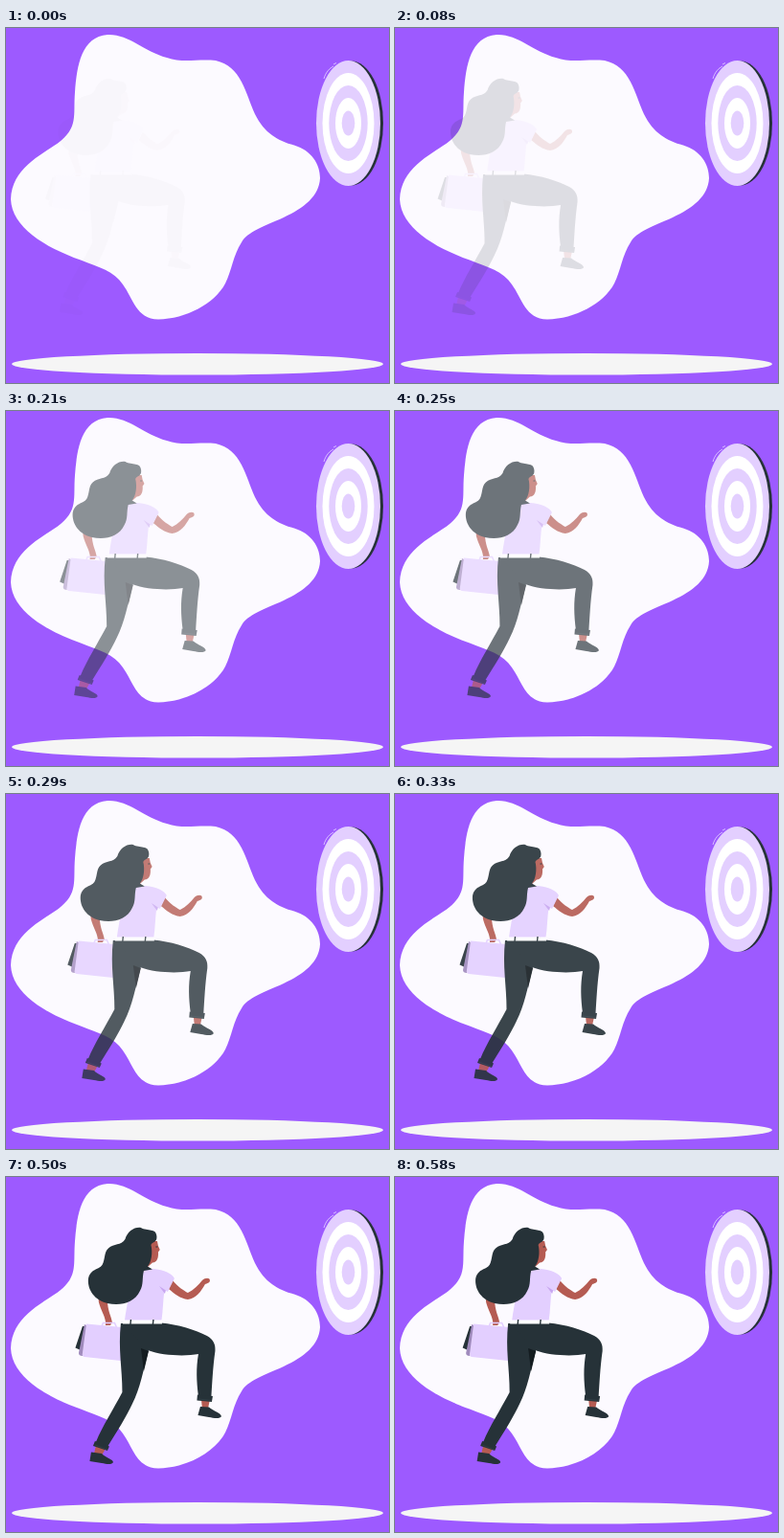
An HTML page for the animation above (620 ms loop, 400 by 371 pixels).

```html
<!DOCTYPE html>
<html lang="en">
<head>
<meta charset="utf-8">
<title>Running to the target</title>
<style>
  html, body { margin: 0; height: 100%; overflow: hidden; background: #9d5aff; }
  svg { display: block; width: 400px; height: 371px; }
  .dark { fill: #263238; }
  .lilac { fill: #e3cfff; }
  .skin { fill: #b55b52; }
  .white { fill: #fff; }
  .line { fill: none; }
</style>
</head>
<body>
<svg viewBox="0 0 400 371">
  <path fill="#fcfaff" d="M106 7C128 6 143 24 168 31C185 37 200 32 219 34C246 40 250 68 260 90C270 110 284 118 301 122.500C319 128 328 142 328 157C327 176 311 188 290 198C270 207 252 213 246 224C237 238 236 253 229 267C218 288 188 304 159 304.500C136 304 133 283 122 268C113 254 97 250 78 242.500C40 229 6 208 5 179C6 147 36 133 54 120.500C76 104 70 92 72 67C74 39 79 9 106 7Z"/>
  <ellipse fill="#f5f5f5" cx="200" cy="351.3" rx="194" ry="11.3"/>

  <g id="target">
    <ellipse class="dark" cx="360.5" cy="99.5" rx="33.5" ry="65"/>
    <ellipse class="lilac" cx="357.5" cy="99.5" rx="33.5" ry="65.5"/>
    <ellipse class="white" cx="357.5" cy="99.5" rx="27" ry="52.5"/>
    <ellipse class="lilac" cx="357.5" cy="99.5" rx="20.2" ry="39.5"/>
    <ellipse class="white" cx="357.5" cy="99.5" rx="13.5" ry="26.5"/>
    <ellipse class="lilac" cx="357.5" cy="99.5" rx="6.8" ry="13"/>
    <path class="line" stroke="#fff" stroke-width=".6" d="M332 53C334 46 338 42 342 40M342 38l3-1.500"/>
  </g>

  <g id="runner">
    <!-- briefcase and the arm that carries it -->
    <path class="dark" d="M78 156L70.500 178.500L76 181L81 156Z"/>
    <path fill="#a08bbd" d="M80 154L74 184Q74 187 78 187L84 156Z"/>
    <path class="lilac" d="M82 153.500L119 157L118 192L80 188Q77 187 78 184Z"/>
    <path class="skin" d="M94 122L95 131C97 139 101 144 102 151L102 155H107L109 152C108 145 104 140 104 128Z"/>
    <path class="line" stroke="#e3cfff" stroke-width="1.6" d="M98 156L99.500 152.500H111.500L113.500 157"/>

    <!-- legs -->
    <path class="skin" d="M92 281L90 289L98 291L102 284ZM202 232L203 242H209L211 233Z"/>
    <path class="dark" d="M87 287.500L98 289C103 294 110 295 110 298C109 301 103 300 98 299L85.500 297ZM201 240L210 240.500C215 245 222 246 223 250C222 253 215 252 210 251L198.500 249Z"/>
    <path class="dark" d="M118 153C115 180 119.500 200 119.500 225C110 243 99 260 92 277L104 282C114 266 124 250 130 237C138 222 142 200 147 181L160 153Z"/>
    <path class="dark" d="M120 153L160 152.500C178 154 196 160 208 166C215 170 217 175 216.500 182C214 200 213.500 215 212.500 229L199 229C197 213 196.500 200 199 185C186 187.500 162 187 146 181Z"/>
    <path class="dark" d="M91 276L106 281.500L104 286L89 281ZM198 227.500L214 229L213 235L197.500 233.500Z"/>
    <path fill="#141c20" d="M139 179L147 182L142 203Z"/>
    <path class="line" stroke="#46525a" stroke-width=".4" d="M91 280L104 285M199 232L213 233.500"/>

    <!-- torso and leading arm -->
    <path class="skin" d="M172 108C178 115 184 119 188 121C194 118 199 113 203 108C206 105 211 105 211 108C211 111 208 111 206 112C202 119 197 127 188 128C180 127 174 122 168 117Z"/>
    <path class="lilac" d="M142 96L152 96C163 97 172 101 174 106L167 120L163.500 118C162 130 162 140 160.500 150H122C123 140 126 130 126 120Z"/>
    <path fill="#c7a6f0" d="M158 114L165 118.500L164 122Z"/>
    <path class="white" d="M121 149.500H161V153.500H120Z"/>
    <path class="line" stroke="#263238" stroke-width="1.400" d="M128.500 149L128 154M152 149L151.500 154"/>

    <!-- head -->
    <path class="skin" d="M147 67H156L157 72L158.800 76L157 78.500C157.500 84 156 89.500 151 89.500L146 94Z"/>
    <path class="line" stroke="#263238" d="M154.500 73H156.500"/>
    <path class="dark" d="M139 53C146 57 155 53 155.500 62C156 69 151 67 149.500 71C151.500 79 150 89 146 93.500L151 96.500L142 98C140 106 142 112 138 119C132 132 117 135 104 132C91 129 83 118 84 106.500C86 96 95 97 98.500 92C102 86 100 79 105 74.500C111 69 118 72 122.500 65C125 57 132 52 139 53Z"/>
  </g>
</svg>
<script>
  const LOOP = 620, STEPS = 15, SHIFT = 30;
  const runner = document.getElementById("runner");
  const curve = (a, b, s) => 3 * a * s * (1 - s) ** 2 + 3 * b * s * s * (1 - s) + s ** 3;

  // cubic-bezier(.36, -.01, .5, 1.38): slides past the end, then settles
  function ease(x) {
    let low = 0, high = 1;
    for (let i = 0; i < 24; i++) {
      const mid = (low + high) / 2;
      if (curve(.36, .5, mid) < x) low = mid; else high = mid;
    }
    return curve(-.01, 1.38, high);
  }

  function draw() {
    const time = performance.now() % LOOP;
    const step = Math.min(STEPS, 1 + Math.floor((time + 5) * STEPS / LOOP));
    const y = ease((step - .1) / STEPS);
    runner.setAttribute("transform", `translate(${SHIFT * (y - 1)} 0)`);
    runner.setAttribute("opacity", Math.max(0, Math.min(1, y)));
    requestAnimationFrame(draw);
  }
  draw();
</script>
</body>
</html>
```
